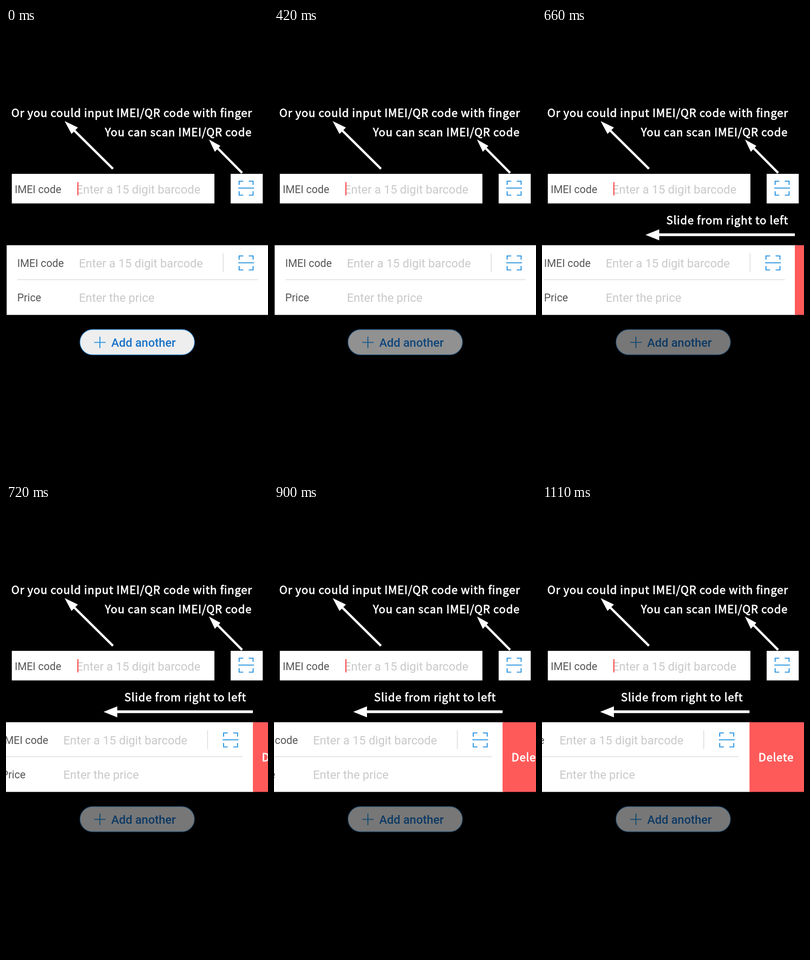
Animation, 572 px wide and 979 px high, one loop 1.44 s. Source, as an HTML page:

```html
<!DOCTYPE html>
<html lang="en">
<head>
<meta charset="utf-8">
<title>Input hints</title>
<style>
  html, body { margin: 0; width: 100%; height: 100%; overflow: hidden; background: #000; }
  svg { display: block; width: 572px; height: 979px; }
  text { white-space: pre; }
  .note { font: 500 24px "Noto Sans CJK SC", "Noto Sans CJK JP", "Noto Sans CJK", sans-serif;
          letter-spacing: .91px; fill: #fff; stroke: #fff; stroke-width: .8px; }
  .label { font: 23px Roboto, sans-serif; fill: #555; }
  .hint { font: 25.7px Roboto, sans-serif; fill: #c9c9c9; }
  .add { font: 500 25.7px Roboto, sans-serif; fill: #1a73c8; }
  .white { fill: #fff; }
  .shaft { stroke: #fff; fill: none; }
  .rule { stroke: #d9d9d9; stroke-width: 1.5; }
  .blue { stroke: #2a93e0; stroke-width: 2.2; fill: none; }
</style>
</head>
<body>
<svg viewBox="0 0 572 979">
  <defs>
    <path id="scan" class="blue" d="M-15-7V-15H-6M6-15H15.5V-7M15.5 7V15.5H6M-6 15.5H-15V7M-17 0H17.5"/>
  </defs>

  <text class="note" x="11.500" y="194">Or you could input IMEI/QR code with finger</text>
  <text class="note" x="216" y="236">You can scan IMEI/QR code</text>
  <path class="shaft" stroke-width="5" d="M147 221.500L233.500 307M460 260L515.500 316"/>
  <path class="white" d="M128 203L157 217L143 231ZM443 243L468 257L456 270Z"/>

  <rect class="white" x="12.700" y="318" width="442.300" height="64.500"/>
  <text class="label" x="18.900" y="360">IMEI code</text>
  <text class="hint" x="153.600" y="361">Enter a 15 digit barcode</text>
  <rect x="156" y="336" width="2" height="29" fill="#ff3030"/>
  <rect class="white" x="490.500" y="318" width="70" height="64.500"/>
  <use href="#scan" x="524" y="349"/>

  <g id="panel">
    <rect class="white" x="1.500" y="473.600" width="574" height="152"/>
    <text class="label" x="24.500" y="521">IMEI code</text>
    <text class="hint" x="159.200" y="522">Enter a 15 digit barcode</text>
    <path class="rule" d="M474.200 491V532M25 548.700H550"/>
    <use href="#scan" x="524" y="512"/>
    <text class="label" x="24.500" y="596">Price</text>
    <text class="hint" x="159.200" y="597">Enter the price</text>
  </g>

  <g id="slide">
    <text class="note" x="291.500" y="428">Slide from right to left</text>
    <path class="shaft" stroke-width="6" d="M274 450.800H572"/>
    <path class="white" d="M246 451L276 439V463Z"/>
    <rect x="572" y="473.600" width="130" height="152" fill="#ff5a5a"/>
    <text class="note" x="591.500" y="559">Delete</text>
  </g>

  <g id="button">
    <rect x="161.500" y="657.500" width="250" height="55" rx="27.500" fill="#eee" stroke="#3a94de" stroke-width="1.300"/>
    <path class="blue" d="M192.500 685.500H217.500M205 673V698"/>
    <text class="add" x="229.700" y="695.300">Add another</text>
  </g>
</svg>
<script>
  const LOOP = 1440, TICK = 30, STEPS = 18, SLIDE_START = 19;
  const [panel, slide, button] = ["panel", "slide", "button"].map(id => document.getElementById(id));
  const progress = n => Math.max(0, Math.min(1, n / STEPS));
  const shift = (el, dx) => el.setAttribute("transform", `translate(${-Math.round(dx)} 0)`);

  function draw() {
    const tick = Math.floor(performance.now() % LOOP / TICK);
    const p = progress(tick - SLIDE_START);
    button.setAttribute("opacity", 1 - 0.5 * progress(tick));
    shift(panel, 121 * p);
    shift(slide, 119 * p);
    slide.setAttribute("visibility", tick < SLIDE_START ? "hidden" : "visible");
    requestAnimationFrame(draw);
  }
  draw();
</script>
</body>
</html>
```
